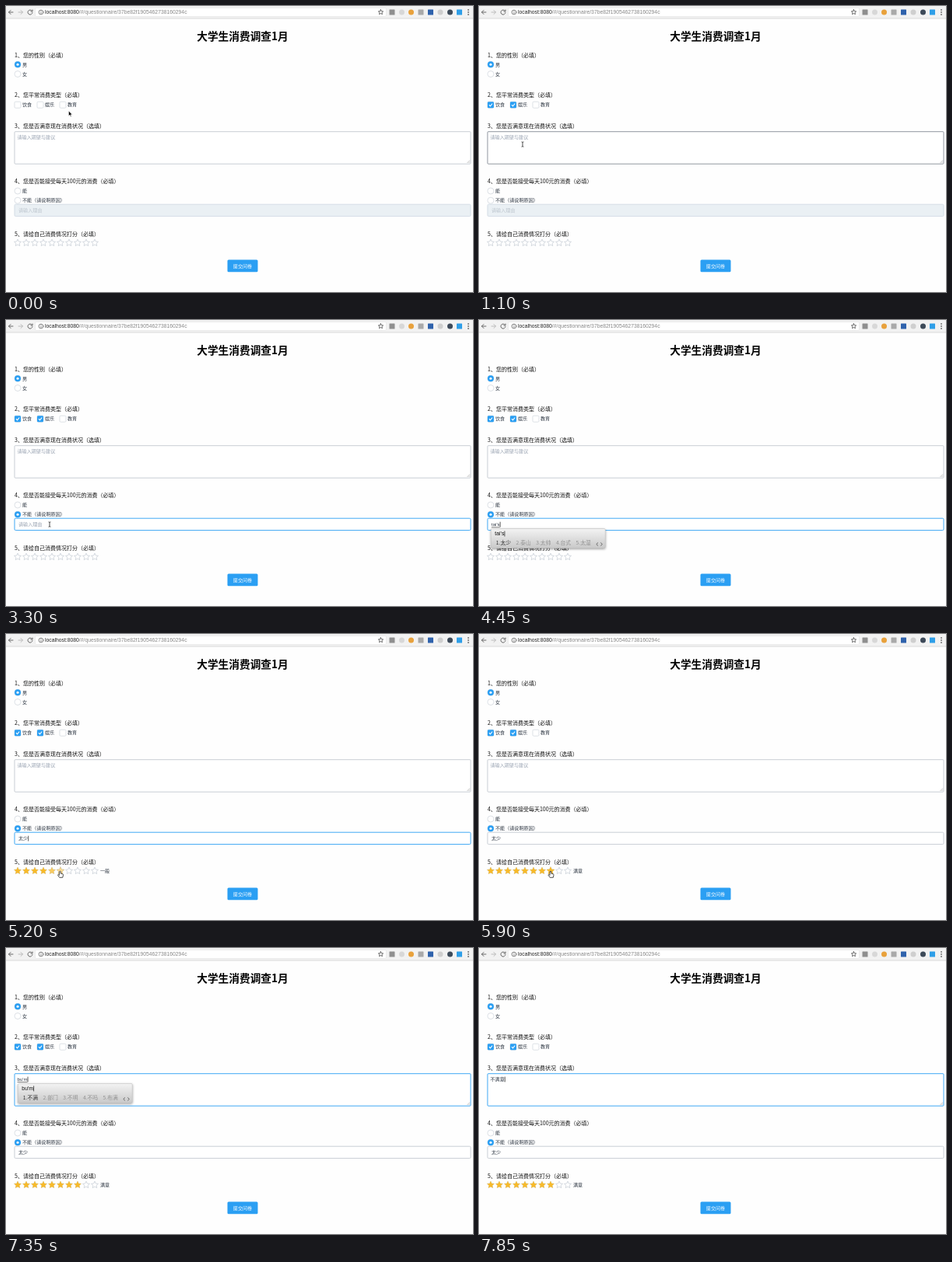
Animation of 600x368 px, one loop 8 s. Source, as an HTML page:

```html
<!DOCTYPE html>
<html>
<head>
<meta charset="utf-8">
<title>问卷</title>
<style>
  html, body { margin: 0; width: 100%; height: 100%; overflow: hidden; background: #fefefe; }
  svg { display: block; width: 600px; height: 368px; }
  text { font-family: "Noto Sans CJK SC", "Noto Sans CJK", sans-serif; font-size: 6.1px; fill: #2b3440; white-space: pre; }
  .latin { font-family: "Liberation Sans", sans-serif; }
  .title { font-size: 13.7px; font-weight: 700; fill: #000; text-anchor: middle; }
  .ask { font-size: 7px; fill: #111; }
  .hint { fill: #99a3b2; }
  .url { font-size: 6.8px; fill: #888; }
  .url tspan { fill: #222; }
  .line { fill: none; stroke: #666; stroke-width: 1; stroke-linecap: round; stroke-linejoin: round; }
  .off { fill: #fff; stroke: #cfd5dc; stroke-width: .7; }
  .on { fill: #2b9ff3; }
  .tick { fill: none; stroke: #fff; stroke-width: 1.1; }
  .caret { stroke: #111; stroke-width: .7; }
  .big { font-size: 6.9px; fill: #111; }
  .pick { font-size: 6.8px; fill: #929292; }
  .pick.first { fill: #333; }
</style>
</head>
<body>
<svg viewBox="0 0 600 368">
  <defs>
    <linearGradient id="bar" x2="0" y2="1">
      <stop stop-color="#f3f3f3"/><stop offset="1" stop-color="#c9c9c9"/>
    </linearGradient>
    <filter id="shade" x="-10%" y="-30%" width="120%" height="180%">
      <feDropShadow dx="0" dy="1" stdDeviation="1.5" flood-opacity=".4"/>
    </filter>
  </defs>
  <rect width="600" height="368" fill="#fefefe"/>

  <rect width="600" height="16" fill="#f2f2f2"/>
  <rect x="37.500" y="2.500" width="451" height="11" rx="1.500" fill="#fff" stroke="#e2e2e2" stroke-width=".6"/>
  <path d="M0 16H600" stroke="#d0d0d0" stroke-width=".8"/>
  <g class="line">
    <path d="M9 8H3.500M6 5.500L3.500 8L6 10.500"/>
    <path d="M16 8H21.500M19 5.500L21.500 8L19 10.500" stroke="#bbb"/>
    <path d="M33.400 6.200A3 3 0 1 0 34 8.500M34 5V7H32"/>
    <circle cx="45" cy="8" r="2.900" stroke-width=".8"/>
    <path d="M45 7.800V9.500M45 6.300V6.400" stroke-width=".8"/>
  </g>
  <text class="latin url" x="50" y="10.300"><tspan>localhost:8080</tspan>/#/questionnaire/37be82f1905462738160294c</text>
  <path id="mark" class="line" transform="translate(481.500 8)" stroke-width=".8"/>
  <g id="tools"></g>
  <g fill="#666"><circle cx="594" cy="5" r=".9"/><circle cx="594" cy="8" r=".9"/><circle cx="594" cy="11" r=".9"/></g>

  <text class="title" x="304" y="44">大学生消费调查1月</text>
  <text class="ask" x="11" y="65.600">1、您的性别（必填）</text>
  <text class="ask" x="11" y="117.300">2、您平常消费类型（必填）</text>
  <text class="ask" x="11" y="157">3、您是否满意现在消费状况（选填）</text>
  <text class="ask" x="11" y="228.300">4、您是否能接受每天100元的消费（必填）</text>
  <text class="ask" x="11" y="295.700">5、请给自己消费情况打分（必填）</text>

  <g id="choices"></g>

  <rect id="areaBox" x="11" y="161.700" width="586" height="41.500" rx="1" fill="#fff" stroke-width=".9"/>
  <path d="M592.500 202L596 198.500M594.500 202L596 200.500" stroke="#999" stroke-width=".6"/>
  <text id="areaHint" class="hint" x="14.500" y="171.200">请输入期望与建议</text>

  <rect id="lineBox" x="11" y="255.200" width="586" height="15.400" rx="1.500" stroke-width=".9"/>
  <text id="lineHint" class="hint" x="16" y="265.300">请输入理由</text>

  <g id="stars"></g>
  <text id="mood" x="121" y="306.700"></text>

  <rect x="284.500" y="326.500" width="39" height="15.800" rx="1.500" fill="#2b9ff3"/>
  <text x="304" y="336.700" text-anchor="middle" style="fill:#fff">提交问卷</text>

  <g id="fields"></g>

  <g id="popup">
    <rect x="0" y="0" width="147" height="25" rx="1.500" fill="url(#bar)" stroke="#b5b5b5" stroke-width=".5" filter="url(#shade)"/>
    <text id="spell" class="latin big" x="5" y="8.800"></text>
    <path id="popCaret" class="caret"/>
    <g id="picks"></g>
    <path class="line" d="M137.300 18.300L135.500 20L137.300 21.700M141.300 18.300L143.100 20L141.300 21.700" stroke="#333"/>
  </g>

  <circle id="ring" r="7.300" fill="#fff" fill-opacity=".5" stroke="#222" stroke-width="1"/>
  <g id="mouse">
    <path id="arrow" d="M0 0V6.400L1.500 5.100L2.500 7.400L3.500 7L2.500 4.800H4.600Z" fill="#000" stroke="#fff" stroke-width=".5"/>
    <path id="beam" d="M-1.400 -3.200Q0 -3.200 0 -2.400Q0 -3.200 1.400 -3.200M0 -2.400V2.400M-1.400 3.200Q0 3.200 0 2.400Q0 3.200 1.400 3.200" fill="none" stroke="#222" stroke-width=".8"/>
    <path id="hand" d="M-.9 4V.2Q0 -.9 .9 .2V2.700L3.400 3.300Q4.100 3.600 4 4.600L3.300 7.800H-.8L-2.900 4.900Q-2.900 3.800 -1.900 4.200L-.9 5Z" fill="#fff" stroke="#222" stroke-width=".8" stroke-linejoin="round"/>
  </g>
</svg>
<script>
const LOOP = 8000, STEP = 50;
const BLUE = '#2b9ff3', GREY = '#c3c9d1', DARK = '#858c96';
const $ = id => document.getElementById(id);

function make(parent, tag, attrs, content = '') {
  const el = document.createElementNS('http://www.w3.org/2000/svg', tag);
  for (const key in attrs) el.setAttribute(key, attrs[key]);
  el.textContent = content;
  parent.append(el);
  return el;
}
const show = (el, yes) => el.style.display = yes ? '' : 'none';

function starPath(r) {
  let d = '';
  for (let i = 0; i < 10; i++) {
    const a = (i / 5 - .5) * Math.PI, k = i % 2 ? r * .47 : r;
    d += (i ? 'L' : 'M') + (k * Math.cos(a)).toFixed(2) + ' ' + (k * Math.sin(a)).toFixed(2);
  }
  return d + 'Z';
}
$('mark').setAttribute('d', starPath(3.3));

// toolbar buttons: x, colour, round
[[496, '#8f8f8f'], [508.5, '#d8d8d8', 1], [520.5, '#e8a13c', 1], [533, '#a9a9a9'],
 [545.5, '#2f62ac'], [558, '#cfcfcf', 1], [570.5, '#3d4a59', 1], [582.5, '#2f9fe8']]
  .forEach(([x, fill, round]) =>
    make($('tools'), 'rect', {x: x - 3.5, y: 4.5, width: 7, height: 7, rx: round ? 3.5 : .5, fill}));

// choices: label, x, y, time ticked, square
const choices = [
  ['男', 15, 75.3, 0], ['女', 15, 87.5, Infinity],
  ['饮食', 15, 127.2, 600, 1], ['娱乐', 44, 127.2, 850, 1], ['教育', 73, 127.2, Infinity, 1],
  ['能', 15, 238, Infinity], ['不能（请说明原因）', 15, 250.2, 2300]
].map(([label, x, y, at, square]) => {
  const g = make($('choices'), 'g', {transform: `translate(${x} ${y})`});
  const box = cls => ({x: -4, y: -4, width: 8, height: 8, rx: square ? 1.3 : 4, class: cls});
  make(g, 'rect', box('off'));
  const on = make(g, 'g', {});
  make(on, 'rect', box('on'));
  if (square) make(on, 'path', {d: 'M-2 0L-.5 1.600L2.200 -1.700', class: 'tick'});
  else make(on, 'circle', {r: 1.5, fill: '#fff'});
  make(g, 'text', {x: 6, y: 2.2}, label);
  return {on, at};
});

const stars = Array.from({length: 10}, (_, i) => {
  const g = make($('stars'), 'g', {});
  make(g, 'path', {d: starPath(4.7), fill: '#fff', stroke: '#c3cad3', 'stroke-width': .7});
  const gold = make(g, 'path', {d: starPath(5), fill: '#f7ba2a'});
  return {g, gold, x: 15 + 11 * i};
});
const MOODS = ['极差', '失望', '一般', '满意', '惊喜'];

// typing: time, text, candidates while composing
function field(x, y, focus, blur, keys) {
  return {
    x, y, focus, blur, keys,
    text: make($('fields'), 'text', {x, y}),
    under: make($('fields'), 'path', {stroke: '#333', 'stroke-width': .6}),
    caret: make($('fields'), 'path', {class: 'caret'})
  };
}
const area = field(14.5, 171.2, 6950, 8000, [
  [7100, 'b', '不 吧 被 把 并'],
  [7200, 'bu', '不 部 步 补 布'],
  [7350, "bu'm", '不满 部门 不明 不吗 布满'],
  [7450, "bu'man", '不满 不慢 布满 步慢 补满'],
  [7600, "bu'man'yi", '不满意 不满 不慢 布满 不'],
  [7800, '不满意']
]);
const line = field(16, 265.3, 3150, 5700, [
  [3600, 't', '他 她 它 天 听'],
  [3750, 'ta', '他 她 它 塔 踏'],
  [3900, 'tai', '太 台 抬 态 胎'],
  [4100, "tai's", '太少 泰山 太帅 台式 太湿'],
  [4550, '太少']
]);
const picks = Array.from({length: 5}, (_, i) =>
  make($('picks'), 'text', {x: 6.5 + 25.7 * i, y: 20.7, class: i ? 'pick' : 'pick first'}));

// pointer: time, x, y
const path = [
  [50, 80.5, 135], [400, 15, 126], [650, 15, 126], [800, 44, 126], [900, 44, 126],
  [1100, 56, 178], [1350, 54, 188], [1400, 54, 188], [1700, 32, 232],
  [1950, 32, 232], [2200, 15, 249], [2800, 15, 249], [3050, 56, 263], [4600, 56, 263],
  [4850, 18, 304], [5200, 69.5, 305.5], [5600, 92, 305.5], [6050, 92, 305.5], [6700, 129, 168]
];
const clicks = [550, 800, 2250, 3100, 5650, 6900];
const hidden = [[3600, 4600], [7100, 8000]];

function pointer(t) {
  const i = path.findIndex(p => p[0] > t);
  if (i < 0) return path[path.length - 1].slice(1);
  if (!i) return path[0].slice(1);
  const [t0, x0, y0] = path[i - 1], [t1, x1, y1] = path[i];
  const u = (t - t0) / (t1 - t0), e = u * u * (3 - 2 * u);
  return [x0 + (x1 - x0) * e, y0 + (y1 - y0) * e];
}

function hovered(t) {
  const [x, y] = pointer(t);
  return t >= 4600 && y > 298 && y < 312 && x < 120 ? Math.ceil((x - 9.5) / 11) : 0;
}
const rating = t => t < 5700 ? hovered(t) : 8;

function drawField(f, t) {
  const key = f.keys.filter(k => k[0] <= t).pop();
  const focused = t >= f.focus && t < f.blur;
  f.text.textContent = key ? key[1] : '';
  f.text.setAttribute('class', key && key[2] ? 'latin' : '');
  const w = key ? f.text.getComputedTextLength() : 0;
  f.caret.setAttribute('d', `M${f.x + w + .5} ${f.y - 5.6}v6.800`);
  show(f.caret, focused && (key || t % 1000 >= 400));
  f.under.setAttribute('d', `M${f.x} ${f.y + 1.3}h${w}`);
  show(f.under, key && key[2]);
  if (key && key[2]) {
    show($('popup'), true);
    $('popup').setAttribute('transform', `translate(15.300 ${f.y + 3.2})`);
    $('spell').textContent = key[1];
    $('popCaret').setAttribute('d', `M${5.6 + $('spell').getComputedTextLength()} 3v7`);
    key[2].split(' ').forEach((word, i) => picks[i].textContent = `${i + 1}.${word}`);
  }
  return {focused, filled: !!key};
}

function draw(t) {
  const [x, y] = pointer(t);
  const seen = !hidden.some(([a, b]) => t >= a && t < b);
  const enabled = t >= 2300;
  const inBox = x > 11 && x < 597;
  const overArea = inBox && y > 161 && y < 204;
  const overLine = inBox && y > 255 && y < 271;
  const edge = (state, over) => state.focused ? BLUE : over ? DARK : GREY;

  choices.forEach(c => show(c.on, t >= c.at));

  show($('popup'), false);
  const a = drawField(area, t), l = drawField(line, t);
  show($('areaHint'), !a.filled);
  show($('lineHint'), !l.filled);
  $('areaBox').setAttribute('stroke', edge(a, overArea));
  $('lineBox').setAttribute('stroke', enabled ? edge(l, overLine) : '#d1dbe5');
  $('lineBox').setAttribute('fill', enabled ? '#fff' : '#eaf0f4');
  $('lineHint').style.fill = enabled ? '' : '#bcc5ce';

  const over = hovered(t), score = rating(t);
  stars.forEach((s, i) => {
    const lit = [0, 50, 100, 150].filter(d => rating(t - d) > i).length / 4;
    s.gold.setAttribute('opacity', lit);
    s.g.setAttribute('transform', `translate(${s.x} 304.800) scale(${over === i + 1 ? 1.1 : 1})`);
  });
  $('mood').textContent = score ? MOODS[Math.ceil(score / 2) - 1] : '';

  const beam = overArea || overLine && enabled;
  const hand = !beam && (over > 0 || y > 122 && y < 132 && x < 92 || y > 233 && y < 255 && x < 28);
  show($('mouse'), seen);
  $('mouse').setAttribute('transform', `translate(${x} ${y})`);
  show($('beam'), beam);
  show($('hand'), hand);
  show($('arrow'), !beam && !hand);
  show($('ring'), clicks.some(c => t >= c && t < c + 150));
  $('ring').setAttribute('cx', x);
  $('ring').setAttribute('cy', y);
}

const start = performance.now();
function tick() {
  const t = (performance.now() - start) % LOOP;
  draw(Math.floor(t / STEP) * STEP);
  requestAnimationFrame(tick);
}
tick();
</script>
</body>
</html>
```
